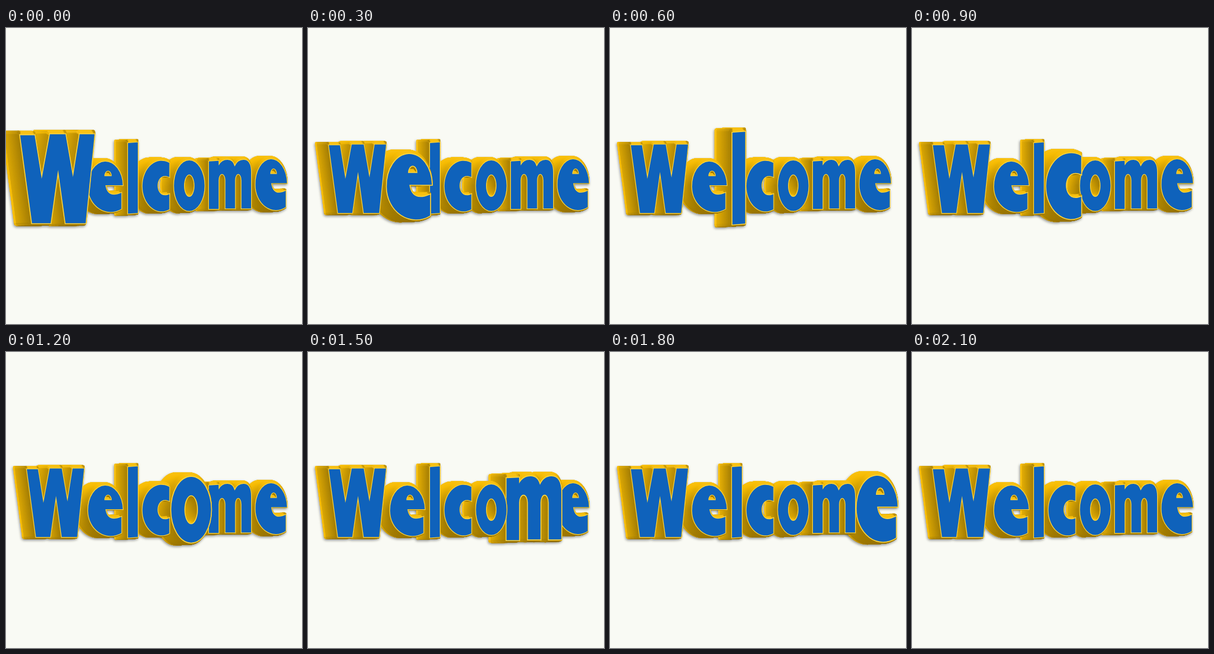
Write an HTML page with a canvas that moves like this. It is 512 px wide and 512 px high and loops after 2400 ms.

```html
<!DOCTYPE html>
<html lang="en">
<head>
<meta charset="utf-8">
<title>Welcome</title>
<style>
  html, body { margin: 0; width: 100%; height: 100%; overflow: hidden; background: #f9faf4; }
  canvas { display: block; width: 512px; height: 512px; }
</style>
</head>
<body>
<canvas id="stage" width="512" height="512" role="img" aria-label="Welcome"></canvas>
<script>
const SIZE = 512, STEP = 300, DEPTH = 22, BEVEL = 2.3, GROWTH = 1.3;
const ctx = document.getElementById('stage').getContext('2d');

// Glyph outlines in a 100 x 100 box; contours after the first are holes.
const GLYPHS = {
  W: 'M0,1 H19.5 L29,50 L40,0 H61 L71,48 L80,0 H100 L88,100 H61 L51,40 L41,100 H16Z',
  e: 'M100,47 A50,48.5 0 0 0 0,50 A65,50 0 0 0 96,94 V62 Q56,74 50,47Z' +
     'M47,29 A10.5,11 0 0 1 68,29Z',
  l: 'M0,1 L100,0 V100 L0,101Z',
  c: 'M98,4 V32 C41,18 41,80 98,66 V96 A70,50 0 0 1 0,50 A70,50 0 0 1 98,4Z',
  o: 'M50,0 A50,50 0 0 1 50,100 A50,50 0 0 1 50,0Z' +
     'M50,28 A17,22 0 0 1 50,72 A17,22 0 0 1 50,28Z',
  m: 'M0,3 L23,2 V11 Q30,0 44,0 Q57,0 61,13 Q68,0 82,0 Q100,0 100,25 V96' +
     ' H77 V40 A7.5,12 0 0 0 62,40 V96 H39 V40 A8,12 0 0 0 23,40 V97 H0Z'
};

// Glyph with the left and right edge of its face.
const WORD = [
  ['W', 36, 135], ['e', 142, 202], ['l', 211, 228], ['c', 236, 283.5],
  ['o', 290.5, 343.5], ['m', 351, 424], ['e', 431.5, 486]
];

// The word recedes to the right, so its top and bottom lines slope.
function faceBox([name, left, right]) {
  const x = (left + right) / 2;
  const tall = 'Wl'.includes(name);
  const top = tall ? 204 - .028 * x : 233.3 - .0135 * x;
  const bottom = tall ? 320 : 320 - .011 * x;
  return { left, top, width: right - left, height: bottom - top };
}

// Gold side wall, lit from above and brighter towards the back (k = 1).
function sideColor(ny, k) {
  const light = 42 - 11 * ny + 14 * (k - .6) * (1 - Math.abs(ny)) + (k > .9 && ny > -.5 ? 6 : 0);
  return `hsl(45.5 94% ${light}%)`;
}

// Samples every contour, with the outer one clockwise and holes the other way.
function contours(glyph) {
  return glyph.match(/M[^Z]*Z/g).map((d, index) => {
    const path = document.createElementNS('http://www.w3.org/2000/svg', 'path');
    path.setAttribute('d', d);
    const length = path.getTotalLength(), n = Math.ceil(length / 2);
    const points = Array.from({ length: n }, (_, i) => {
      const p = path.getPointAtLength(length * i / n);
      return [p.x / 100, p.y / 100];
    });
    const area = points.reduce((sum, p, i) => {
      const q = points[(i + 1) % n];
      return sum + p[0] * q[1] - q[0] * p[1];
    }, 0);
    return area > 0 === (index === 0) ? points : points.reverse();
  });
}

function renderLetter(letter, scale) {
  const canvas = document.createElement('canvas');
  canvas.width = canvas.height = SIZE;
  const c = canvas.getContext('2d');
  const { left, top, width, height } = faceBox(letter);
  const glyph = GLYPHS[letter[0]], shape = contours(glyph);

  // Grow around the middle of the solid.
  const cx = left + width / 2 - DEPTH / 2, cy = top + height / 2;
  c.translate(cx, cy);
  c.scale(scale, scale);
  c.translate(-cx, -cy);
  c.lineCap = 'round';

  const slices = Math.ceil(DEPTH * scale / .7);
  for (let s = slices; s > 0; s--) {
    const k = s / slices, bevel = Math.min(1, k * 8);
    const place = ([u, v]) => [
      left + u * width - DEPTH * k + bevel,
      top + v * height - 3 * bevel * (1 - v) + k * v
    ];
    c.lineWidth = 1 + 2 * BEVEL * bevel;
    for (const points of shape) {
      const ring = points.map(place);
      ring.forEach((p, i) => {
        const q = ring[(i + 1) % ring.length];
        const dx = q[0] - p[0], dy = q[1] - p[1];
        c.strokeStyle = sideColor(-dx / (Math.hypot(dx, dy) || 1), k);
        c.beginPath();
        c.moveTo(...p);
        c.lineTo(...q);
        c.stroke();
      });
    }
  }

  const face = new Path2D();
  face.addPath(new Path2D(glyph), new DOMMatrix([width / 100, 0, 0, height / 100, left, top]));
  c.lineWidth = 2.4;
  c.strokeStyle = '#ffd53c';
  c.stroke(face);
  c.fillStyle = '#0f62bb';
  c.fill(face, 'evenodd');
  return canvas;
}

const sprites = WORD.map(letter => [1, GROWTH].map(scale => renderLetter(letter, scale)));

function draw(active) {
  ctx.fillStyle = '#f9faf4';
  ctx.fillRect(0, 0, SIZE, SIZE);
  // Left letters cover right ones.
  const layers = sprites.map((pair, i) => pair[+(i === active)]).reverse();
  const paint = () => layers.forEach(layer => ctx.drawImage(layer, 0, 0));

  ctx.save();
  ctx.shadowColor = 'rgba(0,0,0,.4)';
  ctx.shadowBlur = 4;
  ctx.shadowOffsetX = -1;
  ctx.shadowOffsetY = 2;
  paint();
  ctx.restore();
  paint();
}

// Each letter grows in turn, then all rest for one step.
let shown = -1, start;
function tick(now) {
  start ??= now;
  const step = Math.floor((now - start) / STEP) % (WORD.length + 1);
  if (step !== shown) draw(shown = step);
  requestAnimationFrame(tick);
}
requestAnimationFrame(tick);
</script>
</body>
</html>
```
